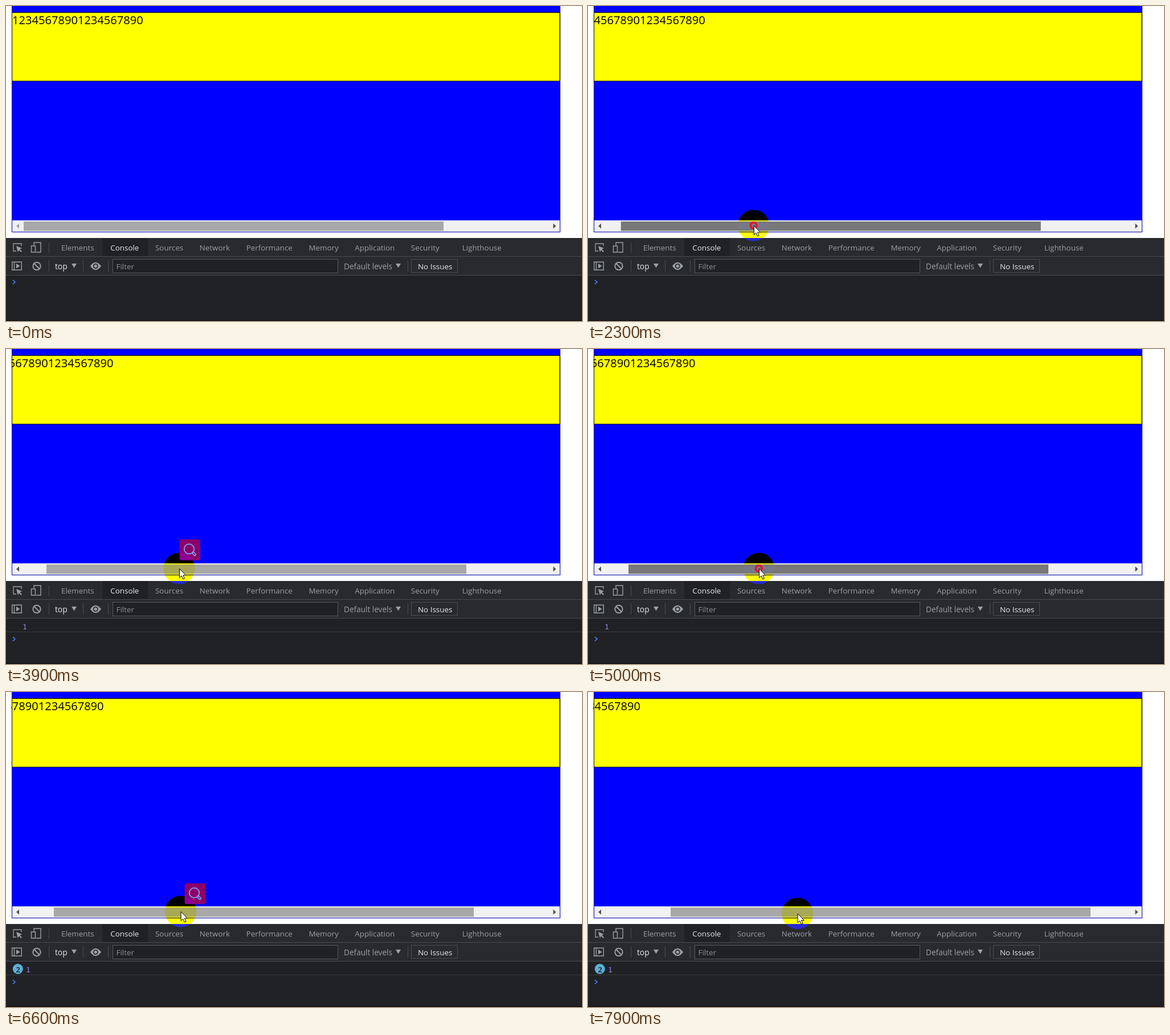
An HTML page with a canvas for the animation above (8000 ms loop, 1011x554 px).

```html
<!DOCTYPE html>
<html lang="en">
<head>
<meta charset="utf-8">
<title>Scroll end demo</title>
<style>
html, body { margin: 0; width: 100%; height: 100%; overflow: hidden; background: #fff; }
canvas { display: block; }
</style>
</head>
<body>
<canvas id="stage" width="1011" height="554"></canvas>
<script>
const ctx = document.getElementById('stage').getContext('2d');
const LOOP = 8000, STEP = 100;
const SANS = '"Open Sans", "Noto Sans", sans-serif';
const MONO = '"DejaVu Sans Mono", monospace';
const GREY = '#9aa0a6', WHITE = '#e8eaed', PANEL = '#292a2d', DARK = '#202124', LINE = '#494c50';
const EDGE = '#0000a8', RED = '#e8102a', PLUM = '#8c0068', SKY = '#7d9cf2';
const THUMB_MIN = 31, THUMB_W = 737, SCROLL_RATIO = 962 / THUMB_W, MOUSE_Y = 386;

// The thumb goes from..to between start and end; the pointer holds it at grip.
const drags = [
  { down: 500, up: 3600, start: 1100, end: 3400, from: 31, to: 71, grip: 232.8, ease: 1.5, rise: 0, dip: 0 },
  { down: 4800, up: 5700, start: 5000, end: 5600, from: 71, to: 84, grip: 228.8, ease: 1, rise: 1.5, dip: 0 },
  { down: 6700, up: 7800, start: 6600, end: 7800, from: 84, to: 145, grip: 222.4, ease: 1, rise: 3.5, dip: 11 }
];

const clamp = v => Math.min(1, Math.max(0, v));
const mix = (a, b, k) => a + (b - a) * k;

function dragPose(d, t) {
  const k = clamp((t - d.start) / (d.end - d.start));
  const thumb = mix(d.to, d.from, (1 - k) ** d.ease);
  return [thumb, thumb + d.grip, MOUSE_Y + d.rise * k + d.dip * Math.sin(Math.PI * k ** 4)];
}

// Before each press the pointer glides over to its next grip.
function pose(t) {
  return drags.map(d => dragPose(d, t)).reduce((a, b, i) => {
    const k = clamp((t - drags[i].down + 600) / 300);
    return a.map((v, j) => mix(v, b[j], k));
  });
}

function box(color, x, y, w, h) {
  ctx.fillStyle = color;
  ctx.fillRect(x, y, w, h);
}

function frame(color, x, y, w, h) {
  ctx.strokeStyle = color;
  ctx.lineWidth = 1;
  ctx.strokeRect(x + 0.5, y + 0.5, w - 1, h - 1);
}

function text(str, x, y, color, size = 13.4, family = SANS, weight = 400) {
  ctx.font = `${weight} ${size}px ${family}`;
  ctx.fillStyle = color;
  ctx.fillText(str, x, y);
}

function fill(d, color) {
  ctx.fillStyle = color;
  ctx.fill(new Path2D(d));
}

function stroke(d, color, width) {
  ctx.strokeStyle = color;
  ctx.lineWidth = width;
  ctx.stroke(new Path2D(d));
}

function circle(x, y, r) {
  ctx.beginPath();
  ctx.arc(x, y, r, 0, Math.PI * 2);
}

function disc(x, y, r, color) {
  circle(x, y, r);
  ctx.fillStyle = color;
  ctx.fill();
}

function ring(x, y, r, color, width) {
  circle(x, y, r);
  ctx.strokeStyle = color;
  ctx.lineWidth = width;
  ctx.stroke();
}

function drawPage(thumb, pressed) {
  box('#fff', 0, 0, 1011, 408);
  box(EDGE, 10, 0, 963, 398);
  box('#00f', 11, 0, 961, 377);
  box('#000', 10.5, 11, 962.5, 121.4);
  box('#ff0', 11, 12, 960.6, 119.6);

  const scroll = (thumb - THUMB_MIN) * SCROLL_RATIO;
  ctx.save();
  ctx.beginPath();
  ctx.rect(9.5, 12, 962, 119);
  ctx.clip();
  text('1234567890'.repeat(2), 11 - scroll, 32, '#000', 20.1);
  ctx.restore();

  box('#f1f1f1', 11, 377, 961, 20);
  box(pressed ? '#787878' : '#a8a8a8', thumb, 379, THUMB_W, 16.5);
  fill('M18 387l5-4.5v9z', scroll ? '#505050' : '#a3a3a3');
  fill('M965.5 387l-5-4.5v9z', '#505050');
}

function drawIcons() {
  // element picker
  stroke('M18 431H13V418H27V422', GREY, 1.3);
  fill('M18 422l10 4-3.7 1.7 3.7 3.8-1.4 1.5-3.8-3.8-1.8 3.8z', GREY);
  // device toggle
  stroke('M49 421V416H61V433H53M44.5 422h7v11h-7z', GREY, 1.4);
  // sidebar
  stroke('M10.7 450.2H27.3V464.3H10.7ZM14.5 450V464.5', GREY, 1.4);
  fill('M18 453l6.5 4.3-6.5 4.3z', GREY);
  // clear
  ring(54, 457.5, 6.7, GREY, 2);
  stroke('M49.3 452.8l9.4 9.4', GREY, 2);
  // eye
  fill('M148 457.5Q157 444 167 457.5Q157 471 148 457.5Z', GREY);
  disc(157.3, 457.5, 4.5, PANEL);
  disc(157.3, 457.5, 2.7, GREY);
  // dropdowns
  for (const x of [115, 684]) fill(`M${x} 453h9l-4.5 7.5z`, GREY);
}

function prompt(y) {
  stroke(`M12 ${y - 3.7}l4 3.7l-4 3.7`, '#3f7cf0', 1.7);
}

function drawTabs() {
  const gap = 28.6;
  let x = 97;
  for (const name of 'Elements Console Sources Network Performance Memory Application Security Lighthouse'.split(' ')) {
    if (name === 'Lighthouse') x += 11.5;
    const active = name === 'Console';
    if (active) box(DARK, 169, 408, 80, 32);
    text(name, x, 430, active ? WHITE : GREY);
    x += ctx.measureText(name).width + gap;
  }
}

function drawConsole(count) {
  box(DARK, 0, 474, 1011, 80);
  box('#151618', 0, 552, 1011, 2);
  if (!count) return prompt(485.5);
  if (count > 1) {
    disc(20.8, 487, 9, '#5db0d7');
    text('2', 17.5, 493, '#111', 13, SANS, 600);
  }
  text('1', count > 1 ? 35 : 29, 493, '#9080e8', 13, MONO);
  box('#3a3b3e', 0, 497, 1011, 1);
  prompt(510);
}

function drawTools() {
  box(PANEL, 0, 408, 1011, 66);
  for (const y of [440, 473]) box(LINE, 0, y, 1011, 1);
  drawTabs();
  box(LINE, 75, 416, 1, 18);
  for (const x of [75, 135, 179, 705]) box(LINE, x, 447, 1, 20);
  box(DARK, 187, 445, 396, 25);
  frame('#55585c', 187, 445, 396, 25);
  frame(LINE, 711, 445, 82, 24);
  text('top', 86, 463, WHITE, 13.8);
  text('Filter', 193.5, 463, '#8b9096');
  text('Default levels', 593, 463, GREY, 13.6);
  text('No Issues', 723, 463, WHITE);
  drawIcons();
}

function drawPopup(x, y, alpha) {
  ctx.save();
  ctx.globalAlpha = alpha;
  ctx.translate(x, y);
  ctx.beginPath();
  ctx.roundRect(0, 0, 36.5, 36.5, 4);
  ctx.fillStyle = PLUM;
  ctx.fill();
  ctx.lineCap = 'round';
  ring(17, 16.7, 8.7, SKY, 1.9);
  stroke('M23.8 23.5l3.2 3.2', SKY, 5);
  stroke('M24.3 24l2.4 2.4', PLUM, 1.6);
  ctx.restore();
}

function drawMouse(t, x, y) {
  ctx.save();
  ctx.globalCompositeOperation = 'difference';
  disc(x, y, 27.6, '#00f');
  ctx.restore();

  for (const { down, up } of drags) {
    if (t === down || t === up) ring(x, y, 15, RED + '80', 3);
    else if (t > down && t < up) ring(x, y, 5.3, RED, 3.6);
  }

  ctx.save();
  ctx.translate(x + 0.7, y + 0.5);
  const arrow = 'M0 0V15.8L3.6 12.4L6.2 18.3L8.8 17.2L6.3 11.5H11.2Z';
  fill(arrow, '#fff');
  stroke(arrow, '#000', 1);
  ctx.restore();
}

function draw(t) {
  const [thumb, x, y] = pose(t);
  drawPage(thumb, drags.some(d => t >= d.down && t < d.up));
  drawTools();
  drawConsole(drags.filter(d => t >= d.up + 300).length);
  drags.forEach((d, i) => {
    const next = drags[i + 1];
    if (!next || t < d.up || t >= next.down) return;
    const [, px, py] = dragPose(d, d.up);
    drawPopup(px + 0.7, py - 51, clamp((t - d.up) / 200));
  });
  if (t >= STEP) drawMouse(t, x, y);
}

const start = performance.now();
function tick() {
  const t = (performance.now() - start) % LOOP;
  draw(Math.floor(t / STEP) * STEP);
  requestAnimationFrame(tick);
}
tick();
</script>
</body>
</html>
```
